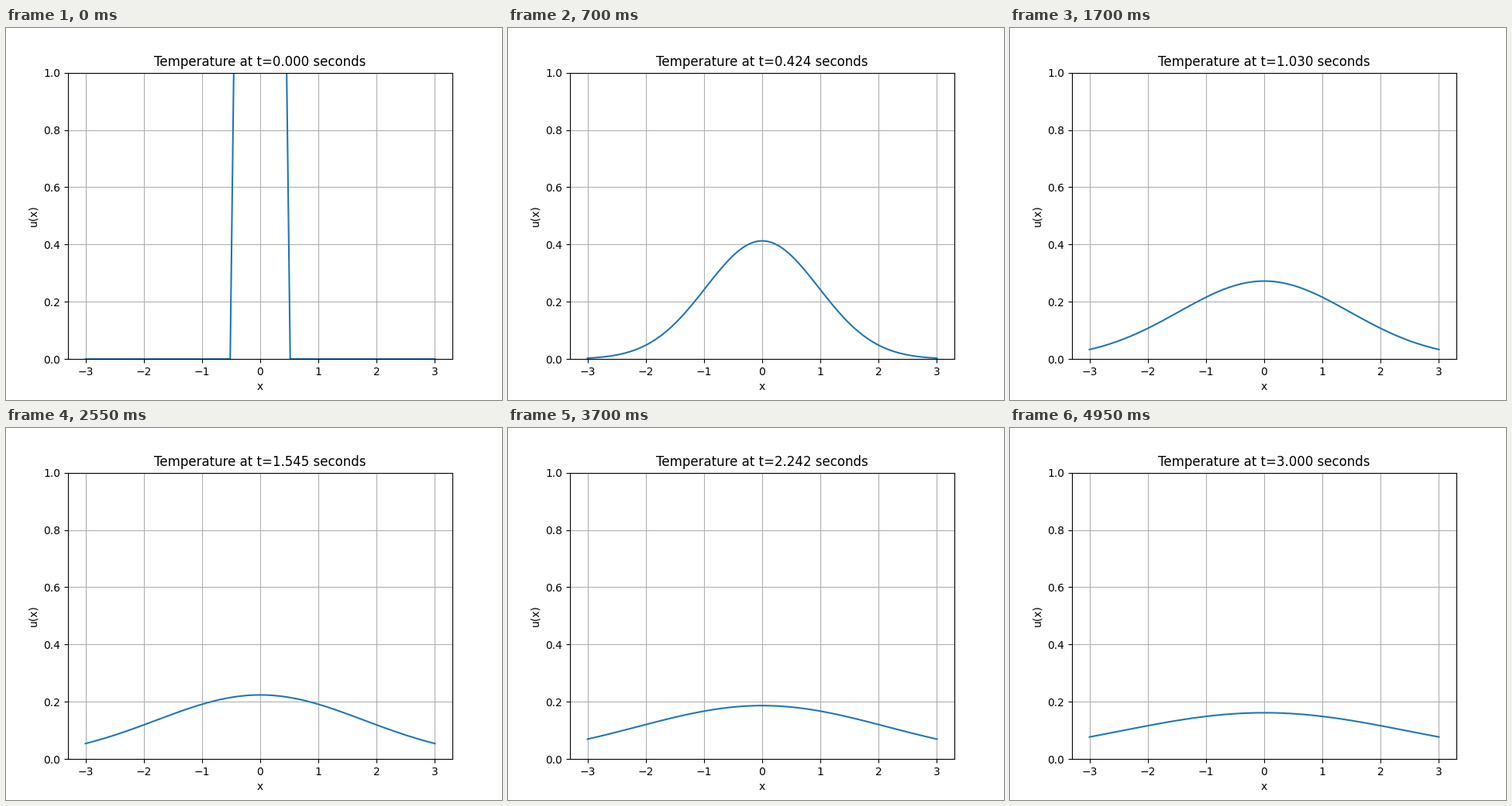
Recreate the animation shown at these times as a matplotlib script. Size 640 px wide and 480 px high, loop 5 s.

```python
import math

import matplotlib.pyplot as plt
import numpy as np
from matplotlib.animation import FuncAnimation

FRAMES = 100
INTERVAL = 50  # ms
HALF_WIDTH = 0.5

x = np.linspace(-3, 3, 100)
times = np.linspace(0, 3, FRAMES)
erf = np.vectorize(math.erf)


def temperature(t):
    """Heat equation on the line, starting from a unit box."""
    if t == 0:
        return np.where(np.abs(x) <= HALF_WIDTH, 1.0, 0.0)
    spread = math.sqrt(4 * t)
    return 0.5 * (erf((x + HALF_WIDTH) / spread) - erf((x - HALF_WIDTH) / spread))


fig, ax = plt.subplots(figsize=(6.4, 4.8), dpi=100)
line, = ax.plot(x, temperature(0))
ax.set_ylim(0, 1)
ax.set_xlabel("x")
ax.set_ylabel("u(x)")
ax.grid(True)
title = ax.set_title("")


def update(i):
    line.set_ydata(temperature(times[i]))
    title.set_text(f"Temperature at t={times[i]:.3f} seconds")
    return line, title


anim = FuncAnimation(fig, update, frames=FRAMES, interval=INTERVAL,
                     repeat=True, repeat_delay=0, blit=False)
plt.show()
```
